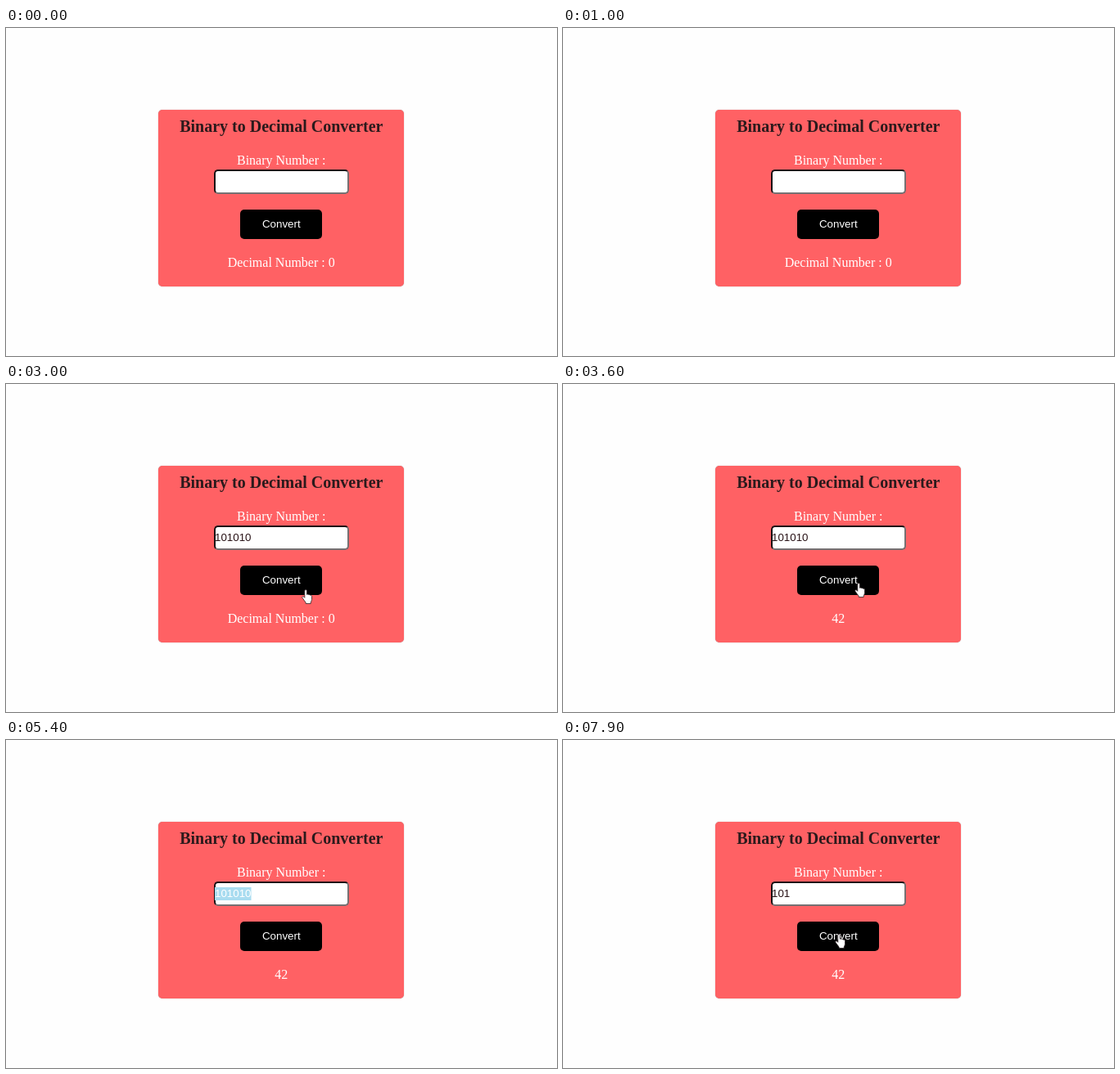
An HTML page for the animation above (8000 ms loop, 673x401 px).

```html
<!DOCTYPE html>
<html lang="en">
<head>
<meta charset="utf-8">
<title>Binary to Decimal Converter</title>
<style>
  html, body { margin: 0; width: 100%; height: 100%; overflow: hidden; background: #fefefe; }
  #stage { position: relative; width: 673px; height: 401px; overflow: hidden; }
  #stage > * { position: absolute; box-sizing: border-box; }
  .card { left: 186px; top: 100px; width: 300px; height: 216px; border-radius: 5px;
          background: #ff6164; box-shadow: 0 0 1px rgba(90, 40, 40, .6); }
  .field { left: 254px; top: 173px; width: 165px; height: 30px; border-radius: 5px; background: #fff;
           border: 2px solid; border-color: #1a1416 #767072 #767072 #1a1416; }
  .button { left: 286px; top: 222px; width: 100px; height: 36px; border-radius: 5px; background: #000; }
  svg { left: 0; top: 0; }
  .serif { font: 16px "Liberation Serif", "Times New Roman", serif; fill: #fff; text-anchor: middle; }
  .title { font-size: 20px; font-weight: bold; fill: #2b1a1c; }
  .sans { font: 13.333px "Liberation Sans", Arial, sans-serif; }
</style>
</head>
<body>
<div id="stage">
  <div class="card"></div>
  <div class="field"></div>
  <div class="button"></div>
  <svg width="673" height="401" viewBox="0 0 673 401">
    <text class="serif title" x="336.3" y="127">Binary to Decimal Converter</text>
    <text class="serif" x="336.2" y="167">Binary Number :</text>
    <rect id="selection" x="255" y="180" width="44.5" height="16" fill="#a9dcf0"/>
    <text id="digits" class="sans" x="255" y="192"></text>
    <rect id="caret" y="181" width="1" height="14" fill="#2a1418"/>
    <text class="sans" x="336.3" y="244" fill="#fff" text-anchor="middle">Convert</text>
    <text id="result" class="serif" x="336.2" y="292"></text>
    <path id="hand" fill="#fff" stroke="#2a2022" stroke-width=".8" stroke-linejoin="round"
      d="M3.8 1.8a1.3 1.3 0 0 1 2.6 0V6.4c.4-.6 1.9-.5 2.2.3.5-.4 1.7-.2 2 .6.7-.4 1.9.1 1.9 1.1v4c0 1.6-1 2.4-1.3 3.6v1.5H5.2v-1.2C4.2 14.5 2 12.4.9 10.3c-.6-1.2.8-2.2 1.8-1.2l1.1 1.2z"/>
  </svg>
</div>
<script>
  const LOOP = 8000, DIGIT = 7.415;
  const el = id => document.getElementById(id);
  const [selection, digits, caret, result, hand] =
    ["selection", "digits", "caret", "result", "hand"].map(el);

  // Each entry holds its value from the given time until the next one.
  const typed = [
    [0, ""], [1200, "1"], [1400, "10"], [1600, "101"], [1800, "1010"], [2000, "10101"],
    [2200, "101010"], [6100, ""], [6400, "1"], [6700, "10"], [6900, "101"]
  ];
  const caretOn = [
    [0, false], [500, true], [1000, false], [1200, true], [2700, false],
    [4600, true], [5200, false], [6100, true], [7400, false]
  ];
  const pointer = [
    [0, null], [3000, [361, 251]], [3100, [358, 248]], [3200, [357, 245]],
    [3400, [356, 244]], [3500, [356, 243]], [4100, [349, 235]], [4200, [336, 225]],
    [4300, null], [7700, [330, 226]], [7800, [332, 234]], [7900, [332, 237]]
  ];

  function at(steps, t) {
    let value;
    for (const [start, v] of steps) if (t >= start) value = v;
    return value;
  }

  function show(node, on) {
    node.setAttribute("visibility", on ? "visible" : "hidden");
  }

  function draw(t) {
    const text = at(typed, t), pos = at(pointer, t);
    const selected = t >= 5400 && t < 6100;
    digits.textContent = text;
    digits.setAttribute("fill", selected ? "#fff" : "#2a1418");
    show(selection, selected);
    caret.setAttribute("x", 255 + Math.round(text.length * DIGIT));
    show(caret, at(caretOn, t));
    result.textContent = t < 3400 ? "Decimal Number : 0" : "42";
    show(hand, pos);
    if (pos) hand.setAttribute("transform", `translate(${pos})`);
  }

  const begin = performance.now();
  function tick() {
    draw((performance.now() - begin) % LOOP);
    requestAnimationFrame(tick);
  }
  tick();
</script>
</body>
</html>
```
